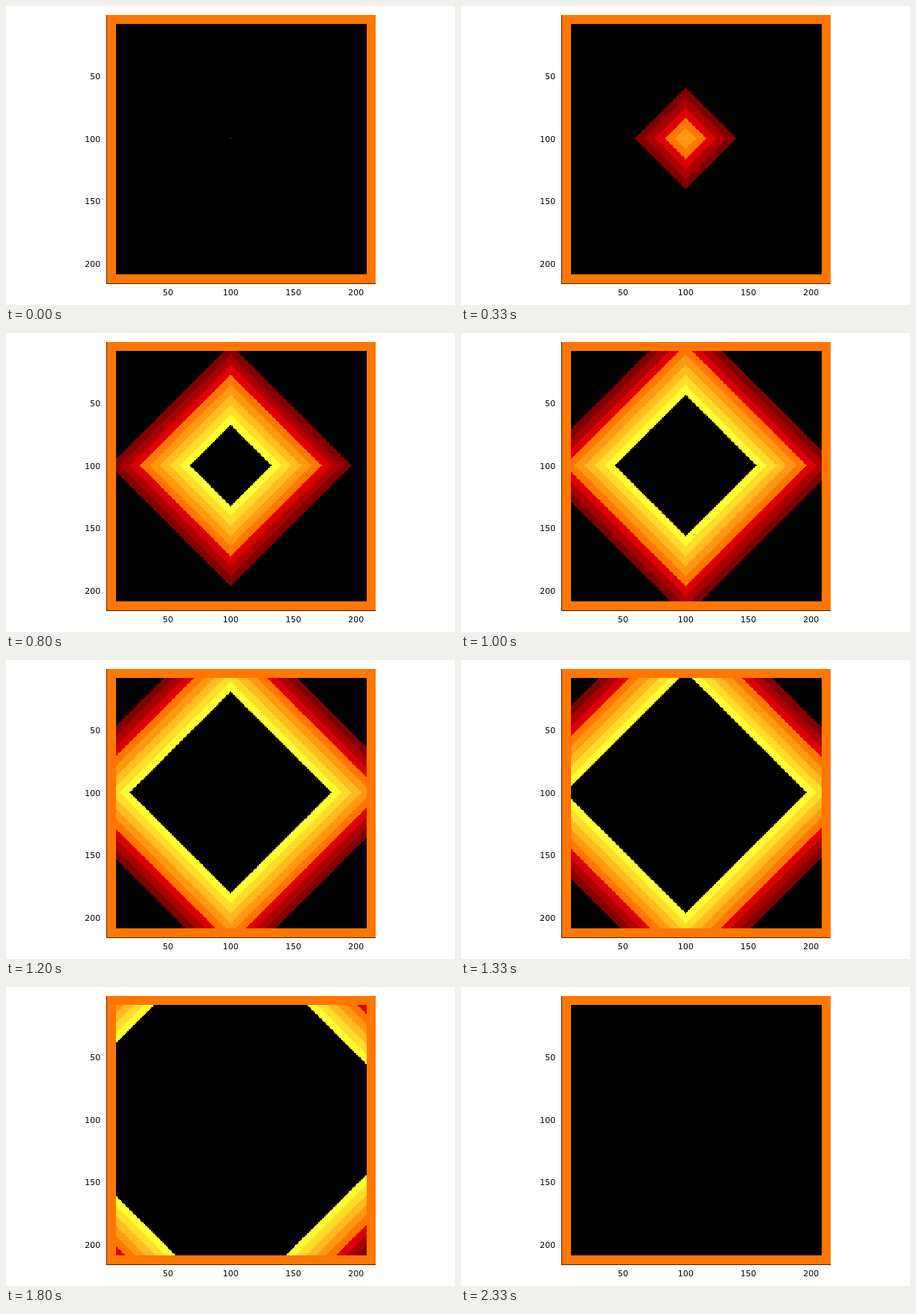
Recreate the animation shown at these times as an HTML page. Size 600x400 px, loop 2.39 s.

```html
<!DOCTYPE html>
<html lang="en">
<head>
<meta charset="utf-8">
<title>Diamond wave</title>
<style>
html, body { margin: 0; width: 100%; height: 100%; overflow: hidden; background: #fff; }
svg { display: block; width: 600px; height: 400px; }
text { font: 11px "DejaVu Sans", sans-serif; fill: #000; }
</style>
</head>
<body>
<svg id="stage" viewBox="0 0 600 400">
  <g shape-rendering="crispEdges">
    <rect x="134" y="12" width="360" height="360" fill="#ff7700"/>
    <rect x="147" y="24" width="335" height="335"/>
    <g id="bands"></g>
  </g>
  <path d="M134.5 12V371.5H494" fill="none" stroke="#000" stroke-opacity=".7"/>
  <g id="labels"></g>
</svg>
<script>
const NS = "http://www.w3.org/2000/svg";
const LOOP = 2390;
const CELL = 360 / 215, X0 = 133.6, Y0 = 10.6;
const FIRST = 8, END = 208, CENTER = 99;   // live cells and seed cell
const WIDTH = 8;                           // cells per band, also cells moved per step
const COLORS = ["#800000", "#aa0000", "#dd0000", "#ff7700",
                "#ff9911", "#ffbb22", "#ffdd2a", "#ffff33", "#000"];

const px = c => Math.round(X0 + c * CELL);
const py = c => Math.round(Y0 + c * CELL);

function add(parent, tag, attrs, text) {
  const el = document.createElementNS(NS, tag);
  for (const key in attrs) el.setAttribute(key, attrs[key]);
  if (text) el.textContent = text;
  return document.getElementById(parent).appendChild(el);
}

// Stepped diamond of all live cells within r steps of the seed
function diamond(r) {
  let d = "";
  const top = Math.max(FIRST, CENTER - r), bottom = Math.min(END - 1, CENTER + r);
  for (let row = top; row <= bottom; row++) {
    const half = r - Math.abs(row - CENTER);
    const left = px(Math.max(FIRST, CENTER - half));
    const right = px(Math.min(END, CENTER + half + 1));
    d += `M${left} ${py(row)}H${right}V${py(row + 1)}H${left}Z`;
  }
  return d;
}

for (const v of [50, 100, 150, 200]) {
  const at = (v - 0.5) * CELL;
  add("labels", "text", { x: X0 + at, y: 387, "text-anchor": "middle" }, String(v));
  add("labels", "text", { x: 126.3, y: Math.round(Y0 + at + 4.4), "text-anchor": "end" }, String(v));
}

const bands = COLORS.map(fill => add("bands", "path", { fill }));
let shown = -1;

function draw(time) {
  // 15 steps per second, on a 10 ms clock
  const step = Math.floor((Math.floor(time % LOOP / 10) + 0.5) * 0.15);
  if (step === shown) return;
  shown = step;
  bands.forEach((band, i) => band.setAttribute("d", diamond((step - i) * WIDTH)));
}

function tick() {
  draw(performance.now() - start);
  requestAnimationFrame(tick);
}

const start = performance.now();
draw(0);
requestAnimationFrame(tick);
</script>
</body>
</html>
```
